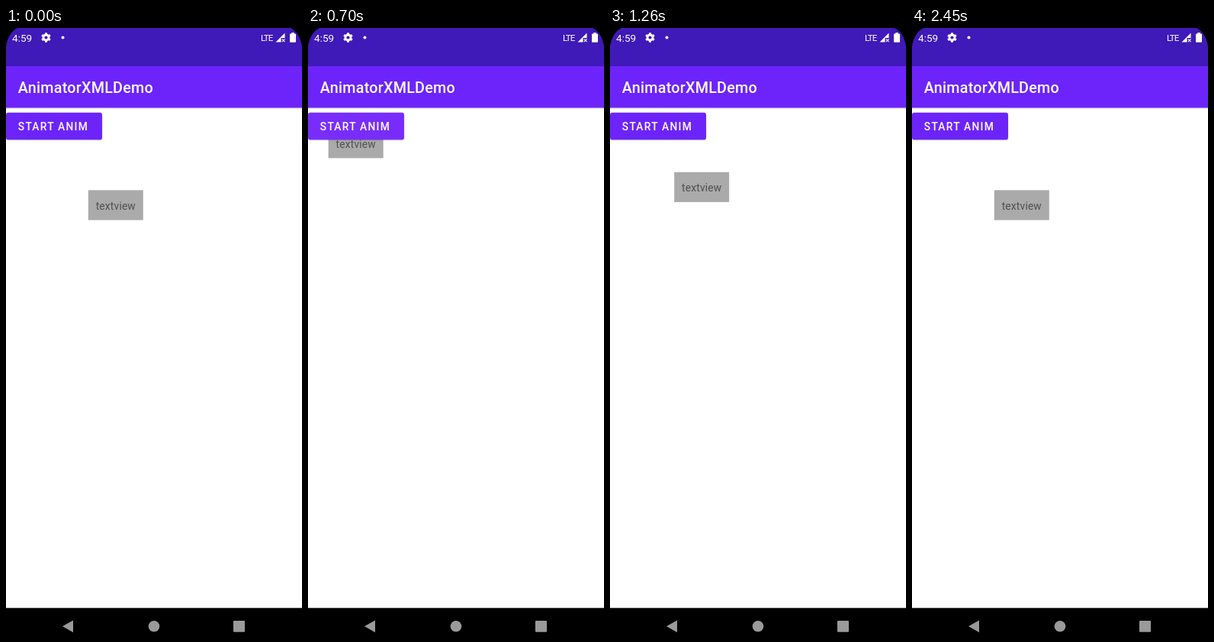
Recreate the animation shown at these times as an HTML page. Size 388 by 796 pixels, loop 2.52 s.

```html
<!DOCTYPE html>
<html lang="en">
<head>
<meta charset="utf-8">
<title>Animator demo</title>
<style>
  html, body { margin: 0; width: 100%; height: 100%; overflow: hidden; background: #fff; }
  svg { display: block; width: 100%; height: 100%; font-family: Roboto, sans-serif; }
  .medium { font-weight: 500; }
</style>
</head>
<body>
<svg viewBox="0 0 388 796">
  <defs>
    <clipPath id="buttonClip"><rect x="0" y="110.5" width="126" height="36" rx="3.5"/></clipPath>
    <linearGradient id="shade" x2="0" y2="1">
      <stop offset="0" stop-color="#000" stop-opacity=".16"/>
      <stop offset="1" stop-color="#000" stop-opacity="0"/>
    </linearGradient>
  </defs>
  <rect width="388" height="796" fill="#fff"/>

  <g id="label">
    <rect width="72" height="39.2" fill="#aaa"/>
    <text x="9.9" y="25.4" font-size="13.83" letter-spacing=".15" fill="#505050">textview</text>
  </g>

  <rect y="104.5" width="388" height="2" fill="url(#shade)"/>
  <rect y="49" width="388" height="55.5" fill="#6d24fb"/>
  <rect width="388" height="50" fill="#4019b9"/>
  <text class="medium" x="15.8" y="85" font-size="19.76" letter-spacing=".25" fill="#fff">AnimatorXMLDemo</text>

  <rect y="111.3" width="126.3" height="36" rx="3.5" fill="#000" opacity=".18"/>
  <g clip-path="url(#buttonClip)">
    <rect y="110.5" width="126" height="36" fill="#6d24fb"/>
    <circle id="ripple" cy="128.5" fill="#b85cff"/>
  </g>
  <text class="medium" x="15.8" y="133.6" font-size="13.83" letter-spacing="1.235" fill="#fff">START ANIM</text>

  <g fill="#fff">
    <text x="8" y="17.6" font-size="13.6">4:59</text>
    <g transform="translate(52.5 12.5)">
      <circle r="3.5" fill="none" stroke="#fff" stroke-width="2.8"/>
      <g id="teeth"></g>
    </g>
    <circle cx="74.5" cy="12.5" r="2"/>
    <text x="334" y="17" font-size="11.6" letter-spacing="-.9">LTE</text>
    <path d="M353.5 18.5 L365.5 6.5 V13 H360.5 V18.5 Z"/>
    <path d="M361.8 14.3 l3.8 3.8 m0 -3.8 l-3.8 3.8" stroke="#fff" stroke-width="1.1"/>
    <path d="M374.3 6 h3.4 v1.4 h1.5 q.8 0 .8 .8 v9.8 q0 .8 -.8 .8 h-6.4 q-.8 0 -.8 -.8 v-9.8 q0 -.8 .8 -.8 h1.5 z"/>
  </g>
  <path d="M0 0 H15 Q3 6 0 24 Z M388 0 H373 Q385 6 388 24 Z" fill="#000"/>

  <rect y="759.3" width="388" height="36.7" fill="#000"/>
  <g fill="#9a9a9a">
    <path d="M74 783.3 L88 775.4 V791.2 Z"/>
    <circle cx="194" cy="783.3" r="7.3"/>
    <rect x="298" y="776" width="15" height="14.8" rx="1"/>
  </g>
</svg>
<script>
  const LOOP = 2520, STEP = 70;
  const PRESS = 420, START = 440, MOVE = 1050, TRAVEL = 107.8;
  const label = document.getElementById("label");
  const ripple = document.getElementById("ripple");
  const clamp = v => Math.min(1, Math.max(0, v));

  document.getElementById("teeth").innerHTML = Array.from({ length: 6 }, (_, i) =>
    `<rect x="-1.5" y="-6.3" width="3" height="3" rx=".4" transform="rotate(${i * 60})"/>`).join("");

  function draw(time) {
    const t = Math.floor((time % LOOP) / STEP) * STEP;

    // The label jumps to the corner, then slides diagonally at constant speed.
    const d = t <= PRESS ? TRAVEL : TRAVEL * clamp((t - START) / MOVE);
    label.setAttribute("transform", `translate(${d.toFixed(2)} ${(104.5 + d).toFixed(2)})`);

    const grow = 1 - (1 - clamp((t - PRESS) / 180)) ** 2;
    const fade = 1 - clamp((t - 560) / 350);
    ripple.setAttribute("cx", 65 - 2 * grow);
    ripple.setAttribute("r", 43 + 23 * grow);
    ripple.setAttribute("opacity", t < PRESS ? 0 : 0.25 * fade);
  }

  const begin = performance.now();
  function tick() {
    draw(performance.now() - begin);
    requestAnimationFrame(tick);
  }
  tick();
</script>
</body>
</html>
```
